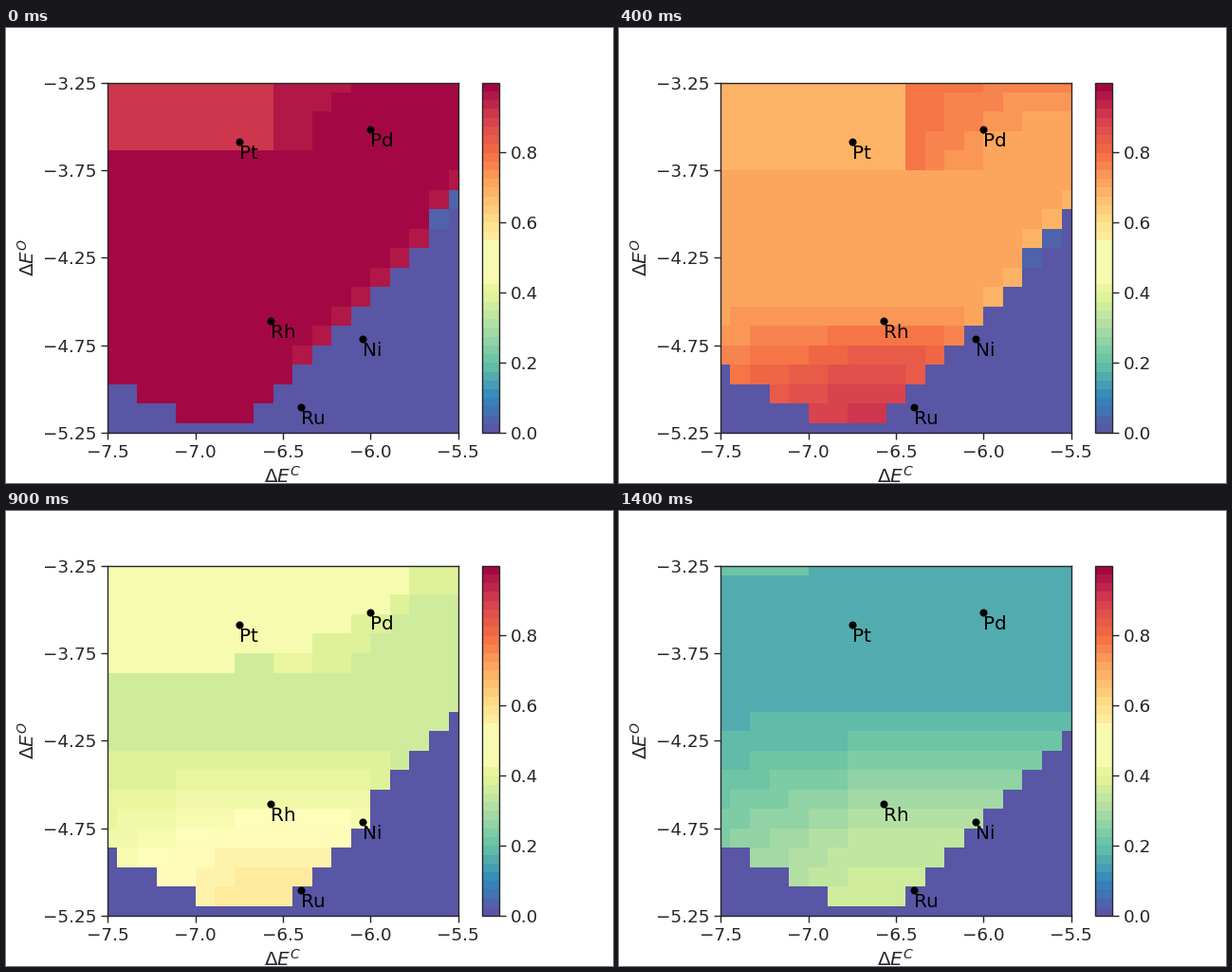
A matplotlib script for the animation above (1.5 s loop, 640 px wide and 480 px high).

```python
import numpy as np
import matplotlib.pyplot as plt
from matplotlib.animation import FuncAnimation
from matplotlib.colors import ListedColormap, Normalize

INK = "#262626"
CELLS = 19
FRAMES, STEP_MS = 15, 100
VMAX = 0.998
BANDS = 40

plt.rcParams.update({
    "font.family": "DejaVu Sans", "font.size": 14.4,
    "axes.labelsize": 14.4, "axes.linewidth": 1,
    "axes.edgecolor": INK, "axes.labelcolor": INK,
    "xtick.labelsize": 13.2, "ytick.labelsize": 13.2,
    "xtick.color": INK, "ytick.color": INK,
    "xtick.major.size": 4.8, "ytick.major.size": 4.8,
    "xtick.major.width": 1, "ytick.major.width": 1,
})

# Key points over the loop, linear in between.
TIMES = (0, 2, 4, 7, 9, 11, 14)
TRACKS = {
    "plateau": (1, 0.887, 0.705, 0.515, 0.37, 0.262, 0.165),
    "cap": (-0.1, -0.115, -0.02, 0.06, 0.085, 0.06, 0.045),
    "cap_width": (9, 10, 10, 16, 15.5, 15, 5),
    "cap_height": (3.6, 4.7, 4.7, 6, 5.5, 3.5, 0.9),
    "wing": (-0.028, 0.04, 0.075, 0, 0.03, 0.02, 0),
    "shore": (26.62, 27.32, 27.52, 28.12, 28.32, 28.62, 28.87),
}

row, col = np.mgrid[:CELLS, :CELLS].astype(float)


def smooth(u):
    u = np.clip(u, 0, 1)
    return u * u * (3 - 2 * u)


def coverage(t):
    k = {name: np.interp(t, TIMES, values) for name, values in TRACKS.items()}
    age = t / (FRAMES - 1)

    # Coverage rises towards the bottom, less so near the left side.
    start = 10.5 - 4.5 * age ** 2
    taper = np.minimum(1, 0.45 + 0.08 * col)
    foot = 0.2 * min(1, t / 4) * taper * smooth((row - start) / (17 - start))

    # The cap in the top left turns from a box into a quarter ellipse.
    power = 2 + 6 * np.clip((7 - t) / 3, 0, 1)
    in_cap = (col / k["cap_width"]) ** power + (row / k["cap_height"]) ** power < 1
    fade = np.clip(1.1 - (col - 10) * (0.05 + 0.055 * row), 0, 1)
    wing = k["wing"] * fade * ((col > 8) & (row < k["cap_height"]))
    value = k["plateau"] + foot + np.where(in_cap, k["cap"], wing)

    # Two slopes bound the covered region; its right rim is a little thinner.
    right = k["shore"] - 1.1 * col
    left = 16 - age ** 2 + col / 2
    floor = np.floor(np.minimum(np.minimum(left, right), CELLS - 1))
    value -= 0.03 * (1 - age) * ((row == floor - 1) & (col > 9))
    faint = (row == floor) & (col > 15) & (right % 1 > 0.78)
    return np.where(row < floor, value, np.where(faint, 0.04, 0))


steps = plt.get_cmap("Spectral_r")((np.arange(BANDS) + 0.5) / BANDS)
cell_cmap = ListedColormap(steps)
bar_steps = steps.copy()
bar_steps[17:22] = steps[17:22].mean(axis=0)  # one wide pale band
norm = Normalize(0, VMAX)

fig = plt.figure(figsize=(6.4, 4.8), dpi=100, facecolor="white")
ax = fig.add_axes([107.2 / 640, 0.11, 369.6 / 640, 0.77])
cax = fig.add_axes([501.6 / 640, 0.11, 18.48 / 640, 0.77])

mesh = ax.pcolormesh(np.linspace(-7.5, -5.5, CELLS), np.linspace(-3.25, -5.25, CELLS),
                     coverage(0), cmap=cell_cmap, norm=norm, shading="nearest")
ax.set(xlim=(-7.5, -5.5), ylim=(-5.25, -3.25),
       xticks=np.arange(-7.5, -5.4, 0.5), yticks=np.arange(-5.25, -3.2, 0.5),
       xlabel=r"$\Delta E^C$", ylabel=r"$\Delta E^O$")

bar = fig.colorbar(plt.cm.ScalarMappable(norm, ListedColormap(bar_steps)), cax=cax)
bar.set_ticks([0, 0.2, 0.4, 0.6, 0.8])

METALS = {"Pt": (-6.747, -3.588), "Pd": (-6.0, -3.517), "Rh": (-6.569, -4.612),
          "Ni": (-6.044, -4.713), "Ru": (-6.396, -5.104)}
for name, (x, y) in METALS.items():
    ax.plot(x, y, "o", color="black", markersize=4.8)
    ax.text(x, y - 0.097, name, color="black")


def draw(frame):
    mesh.set_array(coverage(frame))
    return [mesh]


anim = FuncAnimation(fig, draw, frames=FRAMES, interval=STEP_MS,
                     repeat=True, repeat_delay=0, blit=False)
plt.show()
```
